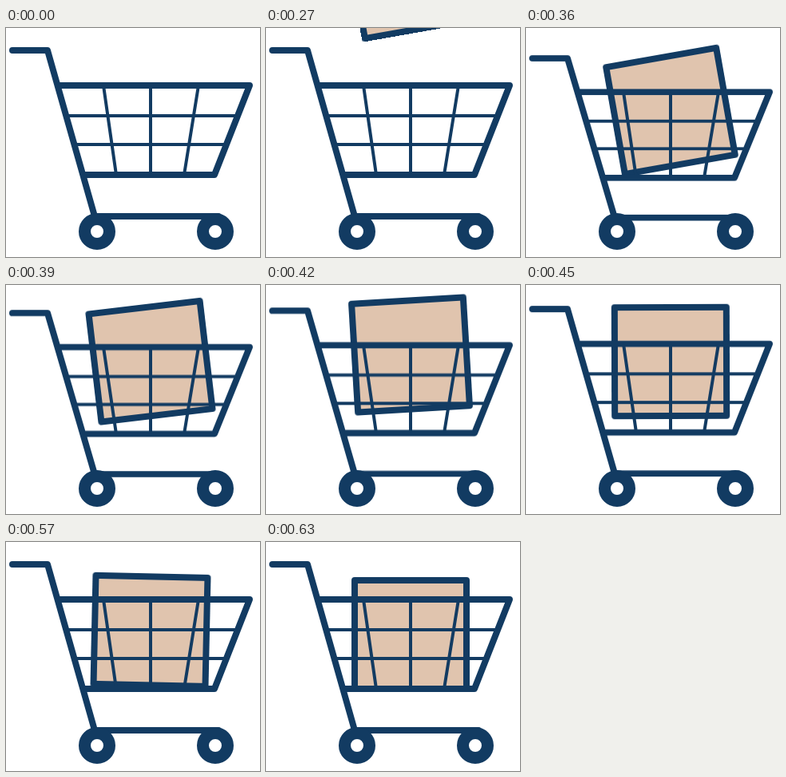
An HTML page for the animation above (2.25 s loop, 318 by 287 pixels).

```html
<!DOCTYPE html>
<html lang="en">
<head>
<meta charset="utf-8">
<title>Shopping cart</title>
<style>
  html, body { margin: 0; width: 100%; height: 100%; overflow: hidden; background: #fff; }
  svg { display: block; width: 318px; height: 287px; }
  g, rect, path, circle { stroke: #123b62; }
  .frame { stroke-width: 8; stroke-linecap: round; stroke-linejoin: round; fill: none; }
  .mesh { stroke-width: 4; fill: none; }
  .wheel { stroke-width: 15; fill: #fff; }
  .box { fill: #e0c4ae; stroke-width: 8; stroke-linejoin: round; }

  /* the 1 ms lead keeps each step safely on its 30 ms boundary */
  .box, .cart { animation: 2250ms -1ms infinite; }
  .box { animation-name: drop; transform-origin: 181px 116px; }
  .cart { animation-name: squash; transform-origin: 0 278px; }

  @keyframes drop {
    0% { transform: translateY(-300px) rotate(-10deg); animation-timing-function: step-end; }
    12% { transform: translateY(-182px) rotate(-10deg); animation-timing-function: steps(3); }
    16% { transform: translateY(-12px) rotate(-10deg); animation-timing-function: steps(2); }
    18.6667% { transform: translateY(-28.5px) rotate(-3.4deg); animation-timing-function: steps(2); }
    21.3333% { transform: translateY(-11.5px) rotate(3.1deg); animation-timing-function: steps(5); }
    28%, 100% { transform: translateY(0) rotate(0deg); }
  }
  @keyframes squash {
    0% { transform: scaleY(1); animation-timing-function: step-end; }
    16% { transform: scaleY(.96); animation-timing-function: steps(2); }
    18.6667% { transform: scaleY(.983); animation-timing-function: steps(2); }
    21.3333%, 100% { transform: scaleY(1); }
  }
</style>
</head>
<body>
<svg viewBox="0 0 318 287">
  <rect class="box" x="111" y="48" width="140" height="136"/>
  <g class="cart">
    <path class="mesh" d="M76 110H290M86 146H276M122 72L138 184M181 72V184M241 72L223 184"/>
    <path class="frame" d="M8 28H52L111 236H266M65 72H305L261 184H97"/>
  </g>
  <circle class="wheel" cx="114" cy="255" r="15.5"/>
  <circle class="wheel" cx="262" cy="255" r="15.5"/>
</svg>
</body>
</html>
```
